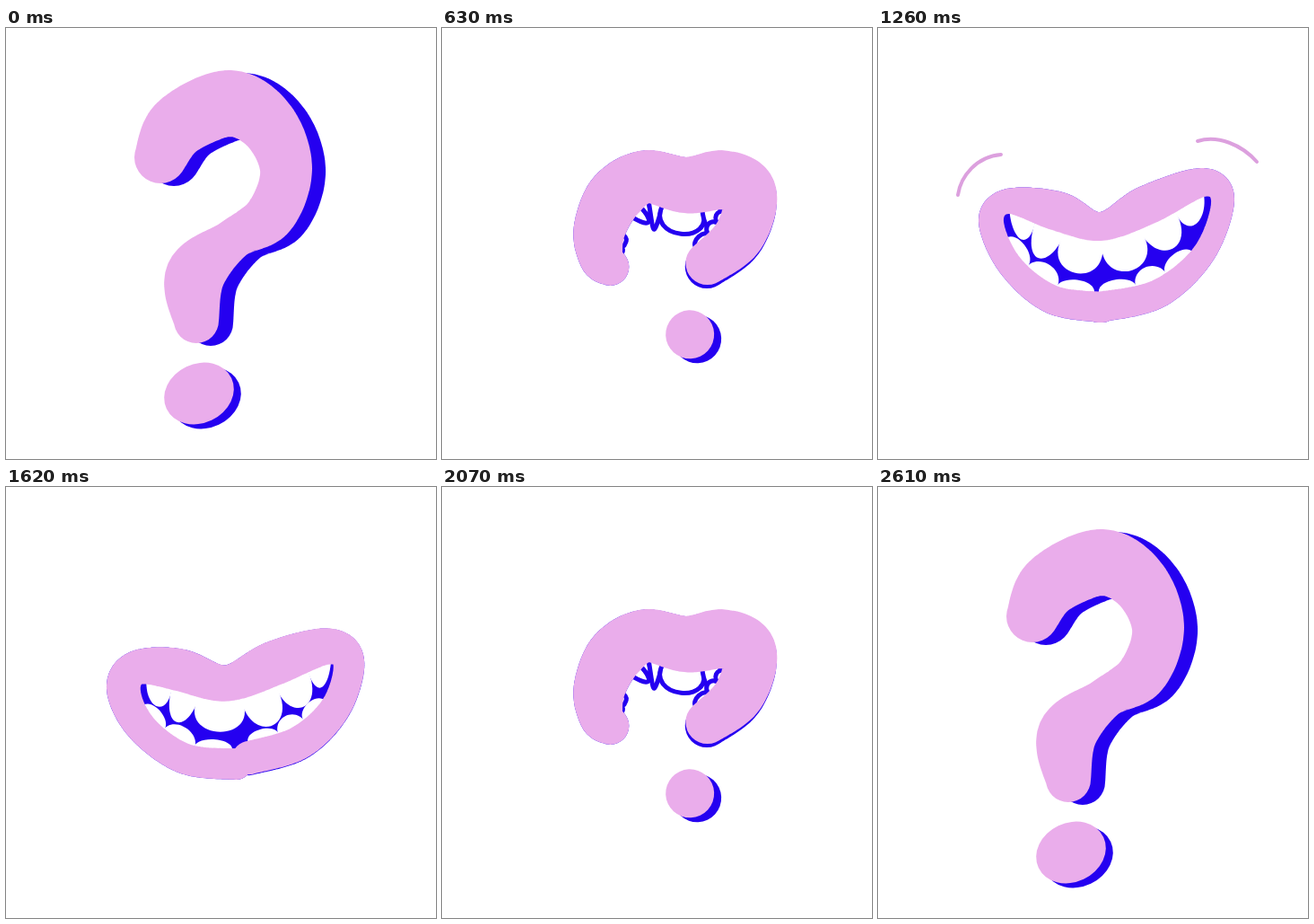
Recreate the animation shown at these times as an HTML page with a canvas. Size 479 px wide and 480 px high, loop 2.7 s.

```html
<!DOCTYPE html>
<html lang="en">
<head>
<meta charset="utf-8">
<title>Question to smile</title>
<style>
html, body { margin: 0; height: 100%; overflow: hidden; background: #fff; }
canvas { display: block; }
</style>
</head>
<body>
<canvas id="stage" width="479" height="480"></canvas>
<script>
const ctx = document.getElementById('stage').getContext('2d');
const PINK = '#eaadeb', BLUE = '#2500f0', MARK = '#dca0de';
const TICK = 90, TICKS = 30, SAMPLES = 240;

// The body is one tube: key points of its spine are [x, y, radius].
// depth: shift of the blue side at the tip and at the tail.
// teeth: [from, to, length] on the spine for the upper, lower left and lower right row.
// dot: x, y and radii.
const poses = [
  {
    spine: [[172,144,29], [193,108,35], [249,84,37], [292,108,33], [312,158,29],
      [294,209,28], [252,236,23], [211,275,33], [212,326,25]],
    depth: [15, 3, 16, 3],
    teeth: [[0, .5, 0], [0, .2, 0], [.8, 1, 0]],
    dot: [215, 407, 40, 33]
  },
  {
    spine: [[149,187,27], [172,140,35], [213,99,34], [261,87,35], [309,112,37],
      [328,157,37], [314,200,35], [282,220,29]],
    depth: [0, 0, -2, 6],
    teeth: [[0, .57, 14], [0, .2, 0], [.8, 1, 0]],
    dot: [264, 369, 27, 27]
  },
  {
    spine: [[270,304,18], [207,304,20], [152,272,26], [142,230,31], [172,204,27], [240,213,29],
      [304,193,31], [366,192,28], [379,222,26], [363,256,25], [325,282,22]],
    depth: [0, 0, 0, 3],
    teeth: [[.4, .7, 36], [0, .19, 9], [.82, 1, 11]],
    dot: [282, 328, 27, 27]
  },
  {
    spine: [[250,311,17], [193,302,16], [147,264,14], [126,215,14], [145,193,14], [200,204,22],
      [248,221,16], [300,197,22], [362,172,16], [384,192,13], [363,251,13], [312,296,16], [245,311,17]],
    depth: [0, 0, 0, 0],
    teeth: [[.333, .667, 44], [.02, .21, 16], [.84, .99, 16]],
    dot: [262, 308, 8, 8]
  }
];

const clamp = (v, low, high) => Math.max(low, Math.min(high, v));
const mix = (a, b, p) => a + (b - a) * p;
const mixAll = (a, b, p) => a.map((v, i) => mix(v, b[i], p));

// Catmull-Rom spline through the key points, t from 0 to 1
function along(keys, t) {
  const last = keys.length - 1, i = Math.min(Math.floor(t * last), last - 1), u = t * last - i;
  const [a, b, c, d] = [-1, 0, 1, 2].map(o => keys[clamp(i + o, 0, last)]);
  return b.map((v, k) => v + u / 2 * (c[k] - a[k] +
    u * (2 * a[k] - 5 * v + 4 * c[k] - d[k] + u * (3 * (v - c[k]) + d[k] - a[k]))));
}

for (const pose of poses)
  pose.curve = Array.from({ length: SAMPLES + 1 }, (_, i) => along(pose.spine, i / SAMPLES));

function tube(curve, color, shift = [0, 0, 0, 0]) {
  ctx.beginPath();
  curve.forEach(([x, y, r], i) => {
    const p = (i / SAMPLES) ** 3;
    const cx = x + mix(shift[0], shift[2], p), cy = y + mix(shift[1], shift[3], p);
    ctx.moveTo(cx + r, cy);
    ctx.arc(cx, cy, r, 0, 7);
  });
  ctx.fillStyle = color;
  ctx.fill();
}

function fillMouth(curve) {
  const trim = Math.round(SAMPLES * .06);
  ctx.beginPath();
  for (const [x, y] of curve.slice(trim, -trim)) ctx.lineTo(x, y);
  ctx.fillStyle = BLUE;
  ctx.fill();
}

// Point at a height above the spine, on the inner side
function inside(curve, t) {
  const i = clamp(Math.round(t * SAMPLES), 1, SAMPLES - 1);
  const [x, y, r] = curve[i], [x0, y0] = curve[i - 1], [x1, y1] = curve[i + 1];
  const size = Math.hypot(x1 - x0, y1 - y0);
  const nx = (y0 - y1) / size, ny = (x1 - x0) / size;
  return h => [x + nx * (r + h), y + ny * (r + h)];
}

function drawTeeth(curve, [from, to, length], count, outlined) {
  if (length < 1) return;
  ctx.fillStyle = '#fff';
  ctx.strokeStyle = BLUE;
  ctx.lineWidth = 5;
  ctx.lineJoin = 'round';
  for (let i = 0; i < count; i++) {
    const left = inside(curve, mix(from, to, i / count));
    const right = inside(curve, mix(from, to, (i + 1) / count));
    const reach = length * (.4 + .6 * Math.sin(Math.PI * (i + .5) / count)) / .75;
    const a = left(-4), b = right(-4), c = left(reach), d = right(reach);
    ctx.beginPath();
    ctx.moveTo(...a);
    ctx.bezierCurveTo(...mixAll(c, d, -.15), ...mixAll(d, c, -.15), ...b);
    ctx.closePath();
    ctx.fill();
    if (outlined) ctx.stroke();
  }
}

function oval(x, y, rx, ry, color) {
  ctx.beginPath();
  ctx.ellipse(x, y, rx, ry, -.44, 0, 7);
  ctx.fillStyle = color;
  ctx.fill();
}

function drawMarks() {
  ctx.strokeStyle = MARK;
  ctx.lineWidth = 4;
  ctx.lineCap = 'round';
  ctx.stroke(new Path2D('M89 186C92 165 110 143 137 141M356 126C379 119 405 130 422 149'));
}

// Starting pose and the progress to the next one in x and in y
function progress(step) {
  if (step < 3) return [0, step / 3, step / 3];
  if (step < 8) {
    const u = (step - 3) / 5;
    return [1, u ** 3 * (10 - 15 * u + 6 * u * u), 1 - (1 - u) ** 2.2];
  }
  const u = (step - 8) / 4, p = Math.min(1.36 * u, 1 + .12 * (1 - u));
  return [2, p, p];
}

function draw(step) {
  const [start, px, py] = progress(step);
  const from = poses[start], to = poses[start + 1];
  const curve = from.curve.map(([x, y, r], i) => {
    const [x1, y1, r1] = to.curve[i];
    return [mix(x, x1, px), mix(y, y1, py), mix(r, r1, py)];
  });
  const closed = step > 5;

  ctx.clearRect(0, 0, 479, 480);
  tube(curve, BLUE, mixAll(from.depth, to.depth, py));
  if (closed) fillMouth(curve);
  from.teeth.forEach((row, i) =>
    drawTeeth(curve, mixAll(row, to.teeth[i], py), i ? 3 : 6, !closed));
  tube(curve, PINK);
  if (!closed) {
    const [x, y, rx, ry] = mixAll(from.dot, to.dot, py);
    oval(x + 8, y + 5, rx, ry, BLUE);
    oval(x, y, rx, ry, PINK);
  }
  if (step > 10) drawMarks();
}

// Hold, bend into the smile, hold, bend back
function frame() {
  const tick = Math.floor(performance.now() / TICK) % TICKS;
  draw(tick < 18 ? clamp(tick - 2, 0, 12) : Math.max(0, 28 - tick));
  requestAnimationFrame(frame);
}
frame();
</script>
</body>
</html>
```
